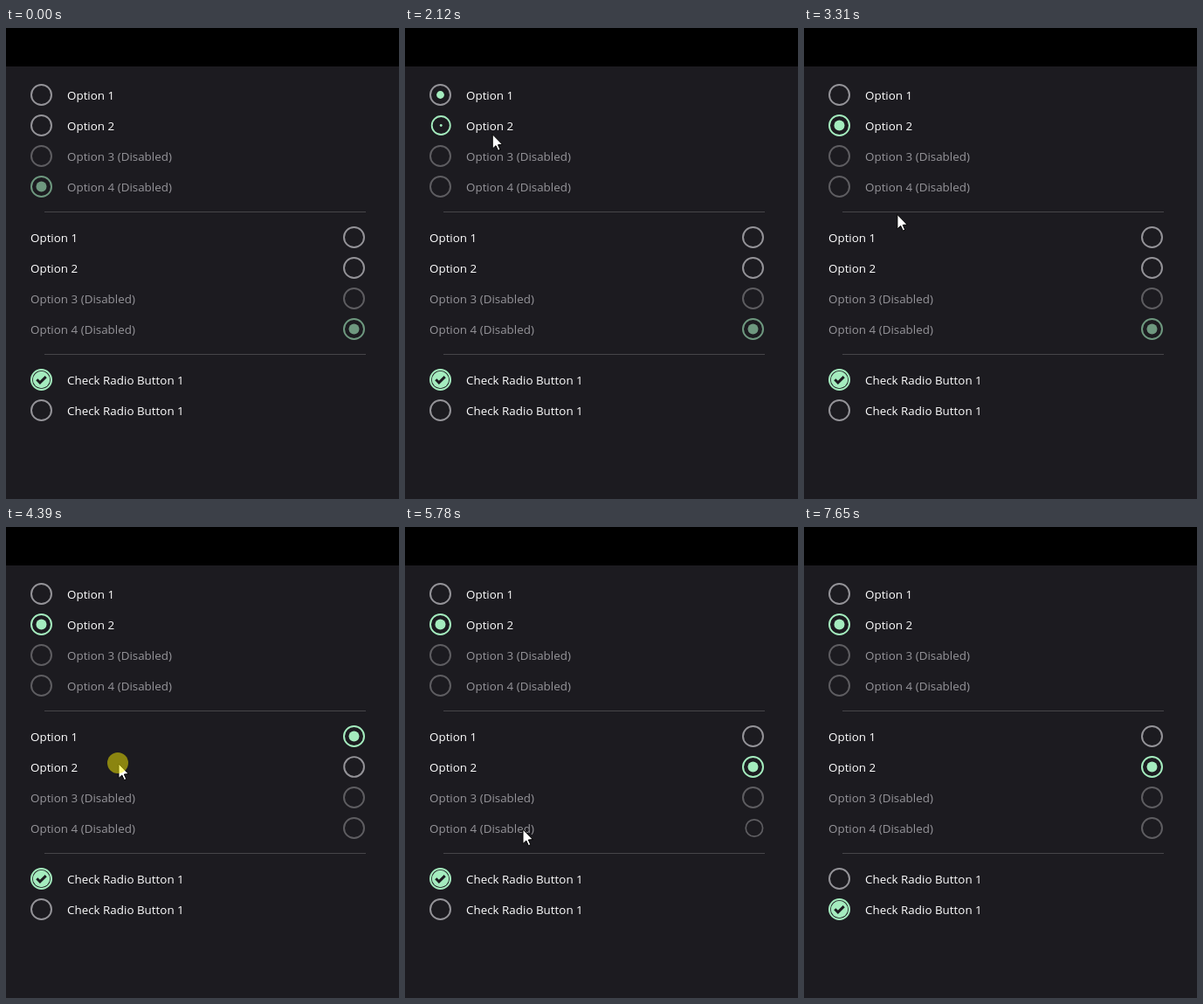
Write an HTML page with a canvas that moves like this. It is 450 by 539 pixels and loops after 8.72 s.

```html
<!DOCTYPE html>
<html lang="en">
<head>
<meta charset="utf-8">
<title>Radio buttons</title>
<style>
html, body { margin: 0; width: 100%; height: 100%; overflow: hidden; background: #1c1b20; }
canvas { display: block; }
</style>
</head>
<body>
<canvas id="stage" width="450" height="539"></canvas>
<script>
const ctx = document.getElementById('stage').getContext('2d');
const LOOP = 8720, SHOWN = 330, HIDDEN = 7650, PRESS = 280, TOGGLE = 140;
const BG = '#1c1b20', ACCENT = '#a4ecbe', ACCENT_OFF = '#6e987f', RING = '#949398', RING_OFF = '#5e5d61';

// The pointer glides to each stop in turn, easing out.
const entry = { x: 310, y: 409 };
const moves = [
  { from: 330, to: 1160, x: 90, y: 62 },
  { from: 1160, to: 1370, x: 88, y: 89 },
  { from: 1800, to: 2740, x: 110, y: 151 },
  { from: 3000, to: 3650, x: 104, y: 241 },
  { from: 4040, to: 4380, x: 128, y: 270 },
  { from: 4600, to: 5500, x: 134, y: 345 },
  { from: 6000, to: 6260, x: 135, y: 410 },
  { from: 6480, to: 6750, x: 135, y: 442 },
  { from: 7160, to: 7650, x: 273, y: 545 }
];

const radios = [];
function addGroup(x, textX, top, labels, selected, check) {
  const group = labels.map((label, i) => ({
    x, textX, y: top + 35 * i, label, check,
    selected: i === selected, disabled: label.includes('Disabled')
  }));
  for (const radio of group) radio.group = group;
  radios.push(...group);
  return group;
}
const options = ['Option 1', 'Option 2', 'Option 3 (Disabled)', 'Option 4 (Disabled)'];
const left = addGroup(40.5, 70, 76.5, options, 3, false);
const right = addGroup(398.5, 28, 239.5, options, 3, false);
const checks = addGroup(40.5, 70, 402.5, Array(2).fill('Check Radio Button 1'), 0, true);

const clicks = [
  { at: 1200, target: left[0] },
  { at: 1890, target: left[1] },
  { at: 2740, target: left[2] },
  { at: 3650, target: right[0] },
  { at: 4385, target: right[1] },
  { at: 5620, target: right[3] },
  { at: 6330, target: checks[0] },
  { at: 6950, target: checks[1] }
];

const clamp = v => Math.min(1, Math.max(0, v));

function pointerAt(t) {
  let { x, y } = entry;
  for (const move of moves) {
    const k = Math.sin(clamp((t - move.from) / (move.to - move.from)) * Math.PI / 2);
    x += (move.x - x) * k;
    y += (move.y - y) * k;
  }
  return { x, y };
}

function radioState(radio, t) {
  let on = radio.selected, dot = on ? 1 : 0, scale = 1;
  for (const { at, target } of clicks) {
    const age = t - at;
    if (age < 0) break;
    const hit = target === radio;
    if (hit) scale = 1 - .16 * Math.sin(Math.PI * clamp(age / PRESS));
    if (target.disabled || target.group !== radio.group || hit === on) continue;
    const growth = clamp((age - 165) / 250);
    dot = hit ? growth : 1 - growth;
    if (age >= TOGGLE) on = hit;
  }
  return { on, dot, scale };
}

function disc(x, y, r, color) {
  ctx.fillStyle = color;
  ctx.beginPath();
  ctx.arc(x, y, r, 0, 7);
  ctx.fill();
}

function drawRadio(radio, t) {
  const { on, dot, scale } = radioState(radio, t);
  const accent = radio.disabled ? ACCENT_OFF : ACCENT;
  ctx.fillStyle = radio.disabled ? '#96959a' : '#fff';
  ctx.fillText(radio.label, radio.textX, radio.y + 5.5);

  ctx.save();
  ctx.translate(radio.x + (1 - scale) * 9, radio.y);
  ctx.scale(scale, scale);
  ctx.strokeStyle = on ? accent : radio.disabled ? RING_OFF : RING;
  ctx.lineWidth = 2;
  ctx.beginPath();
  ctx.arc(0, 0, 11.5, 0, 7);
  ctx.stroke();
  if (dot > 0) {
    ctx.scale(dot, dot);
    disc(0, 0, radio.check ? 9.7 : 6, accent);
    if (radio.check) {
      ctx.strokeStyle = BG;
      ctx.lineWidth = 3;
      ctx.stroke(new Path2D('M-5.2 -.2L-1.6 3.4L5.2 -3.4'));
    }
  }
  ctx.restore();
}

const arrow = new Path2D('M0 0V16.5L3.8 13L6.4 18.6L8.8 17.6L6.3 12L11.3 11.6Z');

function drawPointer(t) {
  const { x, y } = pointerAt(t);
  ctx.save();
  ctx.translate(x + 1, y + 1);
  ctx.fillStyle = '#fff';
  ctx.fill(arrow);
  ctx.strokeStyle = '#000';
  ctx.lineWidth = 1;
  ctx.stroke(arrow);
  ctx.restore();
  if (clicks.some(({ at }) => t >= at && t < at + TOGGLE))
    disc(x, y, 12, 'rgba(250, 240, 0, .5)');
}

function draw(t) {
  ctx.fillStyle = BG;
  ctx.fillRect(0, 0, 450, 539);
  ctx.fillStyle = '#000';
  ctx.fillRect(0, 0, 450, 44);
  ctx.fillStyle = '#464549';
  ctx.fillRect(44, 210, 368, 1);
  ctx.fillRect(44, 373, 368, 1);
  ctx.font = '13.4px "Open Sans", "Noto Sans", sans-serif';
  for (const radio of radios) drawRadio(radio, t);
  if (t >= SHOWN && t < HIDDEN) drawPointer(t);
}

const origin = performance.now();
function frame() {
  draw((performance.now() - origin) % LOOP);
  requestAnimationFrame(frame);
}
frame();
</script>
</body>
</html>
```
